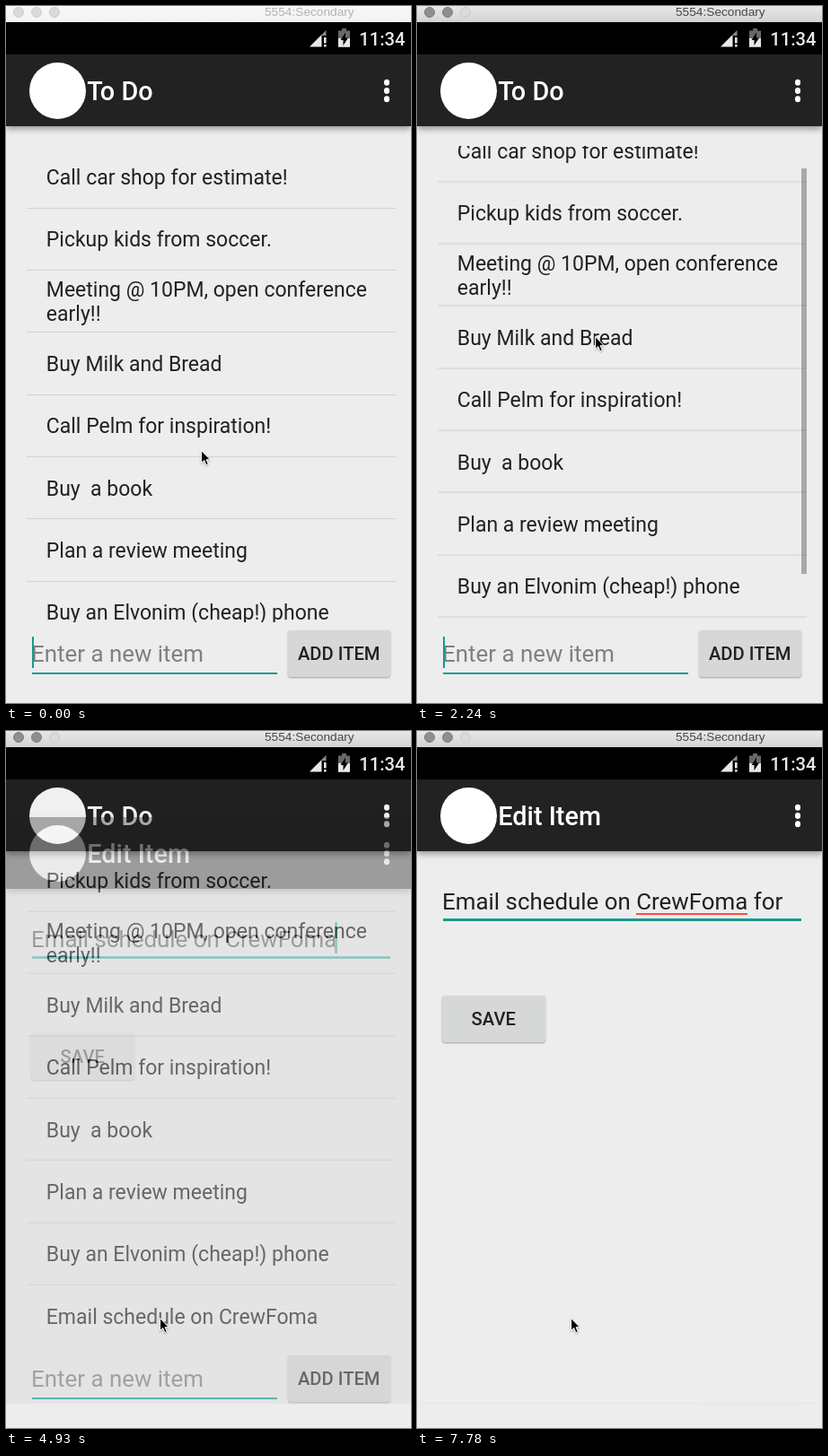
Write an HTML page that moves like this. It is 451 px wide and 777 px high and loops after 8 s.

```html
<!DOCTYPE html>
<html lang="en">
<head>
<meta charset="utf-8">
<title>To Do</title>
<style>
@property --scroll { syntax: "<number>"; inherits: true; initial-value: 0; }

* { box-sizing: border-box; }
html, body { margin: 0; width: 451px; height: 777px; overflow: hidden; }
body { position: relative; background: #ededed; color: #212121; font-family: Roboto, sans-serif; }
body *, .word::after { position: absolute; }
.item, .tail { position: static; }
.item, .field, b { white-space: pre; }
.win, .status, .page, .head, .over, .edit, .rows { left: 0; top: 0; width: 451px; }

/* every animation shares one clock of held poses */
.win, .list, .thumb, .glow, .caret, .dim, .edit, .word::after, .tail, .cursor {
  animation: 8s step-end infinite;
}

.win {
  --hi: #f7f7f7; --lo: #f4f4f4; --ink: #b2b2b2; --dot: #dadada; --ring: #cdcdcd;
  animation-name: focus; height: 18px;
  background: linear-gradient(var(--hi), var(--lo));
}
.win b {
  left: 288px; top: -1px; color: var(--ink);
  font: 13.7px/16px "Liberation Sans", Arial, sans-serif;
}
.win i {
  top: 1px; width: 12px; height: 12px; border-radius: 50%;
  background: var(--dot); border: 1px solid var(--ring);
}
.win i:nth-child(1) { left: 8px; }
.win i:nth-child(2) { left: 28px; }
.win i:nth-child(3) { left: 48px; background: #dadada; border-color: #c9c9c9; }
@keyframes focus {
  3.74%, 100% { --hi: #e8e8e8; --lo: #d3d3d3; --ink: #484848; --dot: #8e8e8e; --ring: #7c7c7c; }
}

.status { top: 18px; height: 36px; background: #000; }
.status svg { left: 0; top: 0; }
.status b { right: 6.5px; top: 7px; color: #e8e8e8; font: 500 20.2px/24px Roboto, sans-serif; }

.page { top: 54px; height: 723px; }
.head { height: 80px; background: #222; box-shadow: 0 3px 7px rgba(0, 0, 0, .38); }
.head b { left: 90.3px; top: 0; color: #fff; font-size: 28.8px; font-weight: 500; line-height: 82px; }
.logo { left: 25.5px; top: 9px; width: 63px; height: 63px; border-radius: 50%; background: #fff; }
.dots {
  left: 421.3px; top: 37.4px; width: 6.2px; height: 6.2px; border-radius: 50%; background: #fff;
  box-shadow: 0 -9.3px #fff, 0 9.3px #fff;
}

.list { animation-name: scroll; left: 23px; top: 102.3px; width: 410.5px; height: 530.7px; overflow: hidden; }
.rows { width: 100%; transform: translateY(calc(var(--scroll) * -1px)); }
.item {
  display: flex; align-items: center; height: 69.36px; padding: 2px 0 0 21.8px;
  border-bottom: 1.4px solid #d2d2d2; font-size: 23px; line-height: 27px;
}
.item:last-child { border-color: transparent; }
.thumb {
  animation-name: thumb; right: 0; top: 0; width: 5.8px; height: 451.5px;
  background: rgba(0, 0, 0, .29); opacity: 0;
  transform: translateY(calc(var(--scroll) * .851px));
}
.glow { animation-name: glow; left: 0; bottom: 0; opacity: 0; }
@keyframes scroll {
  26.1% { --scroll: 7.5; }
  27.99% { --scroll: 29.5; }
  29.86% { --scroll: 57.5; }
  31.74% { --scroll: 79.5; }
  33.6% { --scroll: 91.5; }
  35.49%, 100% { --scroll: 93.3; }
}
@keyframes thumb {
  26.1% { opacity: 1; }
  37.36% { opacity: .84; }
  39.24% { opacity: .5; }
  41.1% { opacity: .2; }
  42.99% { opacity: 0; }
}
@keyframes glow {
  35.49% { opacity: .6; }
  37.36% { opacity: 1; }
  39.24% { opacity: .7; }
  41.1% { opacity: .35; }
  42.99% { opacity: 0; }
}

.field { left: 28px; font-size: 25.9px; line-height: 30px; }
.line { left: 28.5px; height: 2.9px; background: #159a8c; }
.caret { width: 2.8px; height: 35px; background: #159a8c; }
.button {
  height: 52px; border-radius: 3px; background: #d6d7d7; text-align: center;
  font-size: 20.2px; font-weight: 500; line-height: 53px;
  box-shadow: 0 1px 2px rgba(0, 0, 0, .32);
}
.todo .field { top: 653.4px; color: #808080; }
.todo .line { top: 688.6px; width: 273px; }
.todo .caret { animation-name: blink; left: 28.7px; top: 649px; }
.todo .button { left: 314px; top: 641.5px; width: 113.5px; }
@keyframes blink {
  7.37%, 18.6%, 31.74%, 44.86%, 57.86% { opacity: 0; }
  0%, 12.99%, 26.1%, 37.36%, 50.36% { opacity: 1; }
}

.over { top: 54px; height: 696px; overflow: hidden; }
.dim { animation-name: dim; inset: 0; background: #000; opacity: 0; }
.edit {
  animation-name: open; height: 696px; opacity: 0;
  background: #ededed; border-bottom: 1px solid #e6e6e6;
}
.edit .field { top: 121.4px; }
.edit .line { top: 154.9px; width: 399px; }
.edit .caret { animation-name: type; left: 365.8px; top: 117px; }
.edit .button { left: 28px; top: 241px; width: 114.5px; }
.word { position: relative; }
.word::after {
  content: ""; animation-name: spell; left: 0; right: 0; bottom: 0; height: 2.9px;
  background: #fb4d4a; opacity: 0;
}
.tail { animation-name: tail; display: inline-block; clip-path: inset(0 100% 0 0); }
@keyframes dim {
  61.6% { opacity: .06; }
  63.49% { opacity: .15; }
  65.36% { opacity: 0; }
}
@keyframes open {
  0% { opacity: 0; transform: translateY(58px); }
  61.6% { opacity: .35; transform: translateY(42px); }
  63.49% { opacity: .88; transform: translateY(16px); }
  65.36%, 100% { opacity: 1; transform: none; }
}
@keyframes type {
  0%, 76.6% { opacity: 1; transform: none; }
  69.1%, 82.24% { opacity: 0; transform: none; }
  85.99% { opacity: 1; transform: translateX(6.4px); }
  87.86% { opacity: 1; transform: translateX(15.4px); }
  89.74% { opacity: 1; transform: translateX(30.2px); }
  91.6% { opacity: 1; transform: translateX(45.2px); }
  97.24%, 100% { opacity: 0; transform: translateX(45.2px); }
}
@keyframes spell { 85.99%, 100% { opacity: 1; } }
@keyframes tail {
  87.86% { clip-path: inset(0 23.4px 0 0); }
  89.74% { clip-path: inset(0 8.8px 0 0); }
  91.6%, 100% { clip-path: inset(0 -2px 0 0); }
}

.cursor {
  animation-name: move; left: 0; top: 0; overflow: visible;
  filter: drop-shadow(0 1px 1px rgba(0, 0, 0, .3));
}
@keyframes move {
  0% { transform: translate(217px, 495px); }
  3.74% { transform: translate(217px, 488px); }
  5.4% { transform: translate(216px, 465px); }
  7.37% { transform: translate(214px, 432px); }
  9.24% { transform: translate(213px, 400px); }
  11.1% { transform: translate(212px, 375px); }
  12.99% { transform: translate(211px, 363px); }
  18.6% { transform: translate(206px, 380px); }
  20.49% { transform: translate(198px, 406px); }
  26.1% { transform: translate(197px, 390px); }
  27.99% { transform: translate(198px, 368px); }
  29.86% { transform: translate(200px, 340px); }
  31.74% { transform: translate(202px, 318px); }
  33.6% { transform: translate(204px, 306px); }
  35.49% { transform: translate(205px, 303px); }
  39.24% { transform: translate(204px, 330px); }
  41.1% { transform: translate(200px, 390px); }
  42.99% { transform: translate(194px, 470px); }
  44.86% { transform: translate(186px, 550px); }
  46.74% { transform: translate(178px, 610px); }
  48.6% { transform: translate(173px, 645px); }
  50.36%, 100% { transform: translate(171px, 654px); }
}
</style>
</head>
<body>
<div class="win"><i></i><i></i><i></i><b>5554:Secondary</b></div>

<div class="status">
  <svg width="451" height="36">
    <path d="M338 27.5 351.5 14v13.5z" fill="#e8e8e8"/>
    <path d="M351.5 14 356.5 9v6h-5z" fill="#8a8a8a"/>
    <path d="M354 17h2.6v6.5H354zM354 25h2.6v2.6H354z" fill="#e8e8e8"/>
    <path d="M374 7h5v2.5h4V18h-13V9.5h4z" fill="#686868"/>
    <path d="M370 18h13v9.8h-13z" fill="#e8e8e8"/>
    <path d="M378 11.5v6h3l-5.5 8.5v-6h-3z" fill="#000"/>
  </svg>
  <b>11:34</b>
</div>

<div class="page todo">
  <div class="list">
    <div class="rows">
      <div class="item">Call car shop for estimate!</div>
      <div class="item">Pickup kids from soccer.</div>
      <div class="item">Meeting @ 10PM, open conference&#10;early!!</div>
      <div class="item">Buy Milk and Bread</div>
      <div class="item">Call Pelm for inspiration!</div>
      <div class="item">Buy  a book</div>
      <div class="item">Plan a review meeting</div>
      <div class="item">Buy an Elvonim (cheap!) phone</div>
      <div class="item">Email schedule on CrewFoma</div>
    </div>
    <svg class="glow" width="411" height="40"><path d="M0 40V23Q205 -4 411 23V40z" fill="#000" fill-opacity=".035"/></svg>
    <i class="thumb"></i>
  </div>
  <div class="head"><i class="logo"></i><b>To Do</b><i class="dots"></i></div>
  <div class="field">Enter a new item</div>
  <i class="line"></i><i class="caret"></i>
  <div class="button">ADD ITEM</div>
</div>

<div class="over">
  <i class="dim"></i>
  <div class="edit">
    <div class="head"><i class="logo"></i><b>Edit Item</b><i class="dots"></i></div>
    <div class="field">Email schedule on <span class="word">CrewFoma</span><span class="tail"> for</span></div>
    <i class="line"></i><i class="caret"></i>
    <div class="button">SAVE</div>
  </div>
</div>

<svg class="cursor" width="12" height="18">
  <path d="M.5.5v14l3.2-3 2.2 5.2 2.4-1-2.2-5H10.300z" fill="#000" stroke="#fff"/>
</svg>
</body>
</html>
```
